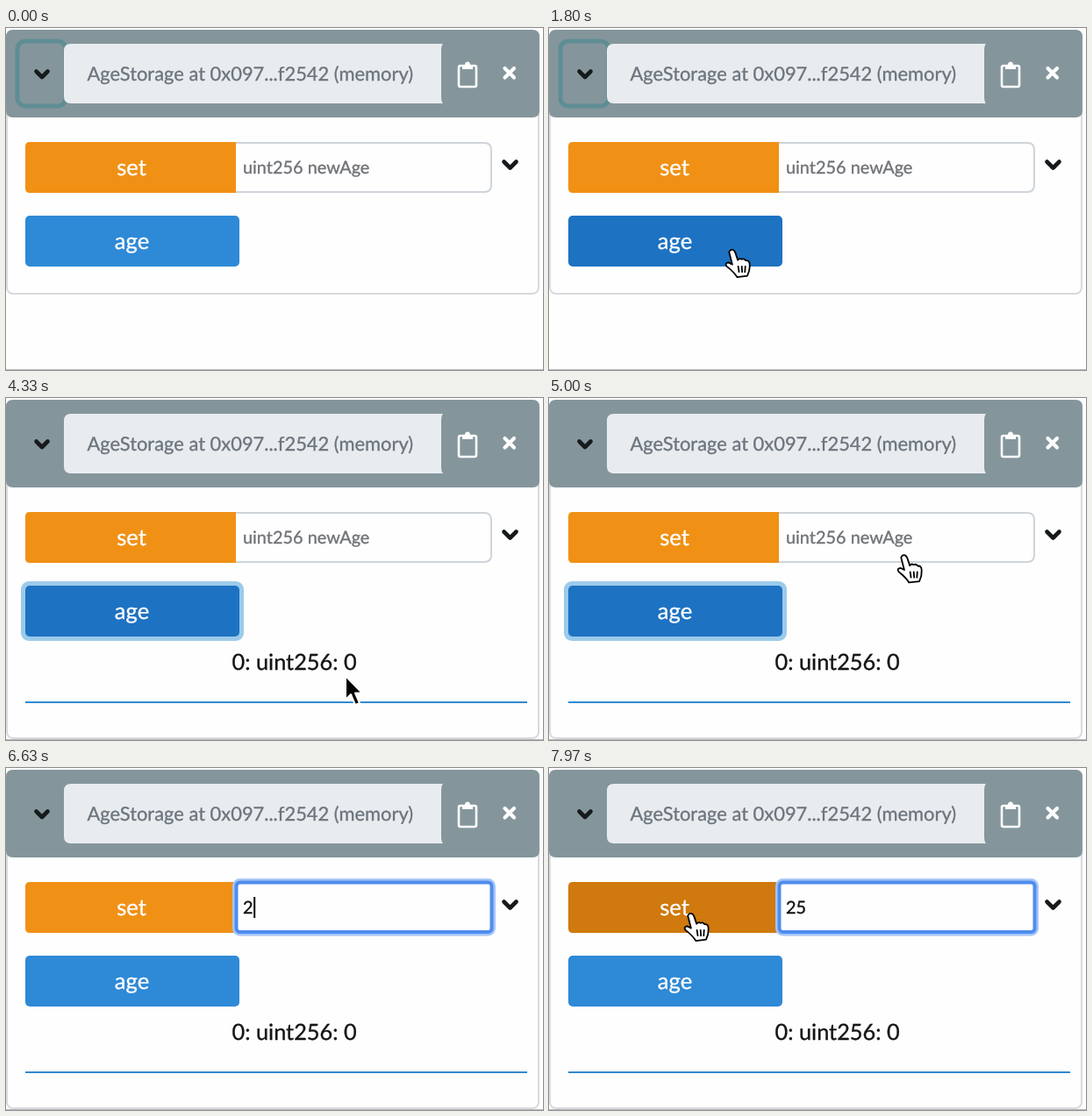
These frames come from a looping animation (612 px wide and 390 px high, 8 s). An HTML page:

```html
<!DOCTYPE html>
<html lang="en">
<head>
<meta charset="utf-8">
<title>Contract panel</title>
<style>
  html, body { margin: 0; width: 100%; height: 100%; overflow: hidden; background: #fefefe; }
  svg { display: block; width: 612px; height: 390px; }
  text {
    font-family: Lato, sans-serif; font-size: 25.3px; white-space: pre;
    text-rendering: geometricPrecision;
    color: #151515; fill: currentColor; stroke: currentColor; stroke-width: 0.35px;
  }
  .label { color: #fefefe; text-anchor: middle; font-size: 25.6px; }
  .address { color: #6c757d; font-size: 21.9px; }
  #field { font-size: 19.9px; }
  .icon { fill: none; stroke: #161a1c; stroke-width: 4.6; stroke-linecap: round; stroke-linejoin: round; }
  .white { stroke: #fefefe; }
  .pointer { fill: #fff; stroke: #000; stroke-width: 2; stroke-linejoin: round; stroke-linecap: round; }
</style>
</head>
<body>
<svg viewBox="0 0 612 390">
  <rect width="612" height="390" fill="#fefefe"/>
  <path d="M0 389.5H612" stroke="#b8b8bc"/>
  <rect id="card" x="1" y="60" width="606" height="243" rx="7" fill="#fefefe" stroke="#d9dade" stroke-width="2"/>
  <path d="M0 102V10Q0 2 8 2H600Q608 2 608 10V94Q608 102 600 102H8Q0 102 0 94Z" fill="#84969c"/>

  <rect id="toggleRing" x="13" y="15" width="55" height="74" rx="9" fill="none" stroke="#5f8d94" stroke-width="5"/>
  <path class="icon" d="M34.500 49.500L41 56L47.500 49.500"/>
  <path d="M74 18H498Q496 20 496 26V78Q496 84 498 86H74Q66 86 66 78V26Q66 18 74 18Z" fill="#e9ecef"/>
  <text class="address" x="92.500" y="59.500">AgeStorage at 0x097...f2542 (memory)</text>
  <rect class="icon white" x="516" y="43" width="20" height="24" rx="2" style="stroke-width:2.600"/>
  <path d="M520 47V43Q520 42 521 42H523Q523 38.500 526 38.500T529 42H531Q532 42 532 43V47Z" fill="#fefefe"/>
  <path class="icon white" d="M568.500 46L579 56.500M579 46L568.500 56.500" style="stroke-width:4.200"/>

  <path d="M262 131H545Q553 131 553 139V179Q553 187 545 187H262" fill="#fefefe" stroke="#ced4da" stroke-width="2"/>
  <path id="setButton" d="M27 130H262V188H27Q22 188 22 183V135Q22 130 27 130Z"/>
  <text class="label" x="143" y="168">set</text>
  <g id="inputRing" fill="#fefefe">
    <rect x="261.500" y="129.500" width="293" height="58.500" rx="5" stroke="#a6c6f7" stroke-width="7"/>
    <rect x="262.500" y="130.500" width="291" height="56.500" rx="4" stroke="#4f8cee" stroke-width="4"/>
  </g>
  <text id="field" x="270" y="166"></text>
  <rect id="caret" y="147" width="2" height="24" fill="#000"/>
  <path class="icon" d="M567.500 152.500L574.500 159.500L581.500 152.500"/>

  <rect id="ageRing" x="17" y="209" width="254" height="68" rx="9" fill="#9ccbea"/>
  <rect id="ageButton" x="22" y="214" width="244" height="58" rx="5"/>
  <text class="label" x="143.500" y="251.500">age</text>

  <g id="result">
    <text x="257.500" y="309.500">0: uint256: 0</text>
    <path d="M22 347H594" stroke="#3189d0" stroke-width="2"/>
  </g>

  <g id="cursor">
    <path id="arrow" class="pointer" style="fill:#000;stroke:#fff" d="M0 0V27L6 21L11 33L16 31L11 19.500H19Z"/>
    <g id="hand" class="pointer" transform="translate(-1 0) scale(.9)">
      <path d="M-3 3Q-2 -1 2 0Q4 1 5 4L8 13Q10 10 13 12Q16 10.500 18 13.500Q23 13 23 19Q23.500 26 20 33L7 34.500Q3 28 -6 21Q-9 17 -4 16L1 18.500Z"/>
      <path d="M8.500 21L9.500 28M13 21L13.500 28M17.500 21L17 28"/>
    </g>
  </g>
</svg>
<script>
const LOOP = 8000;
const el = id => document.getElementById(id);
const show = (id, on) => { el(id).style.display = on ? "" : "none"; };
const ease = p => p * p * (3 - 2 * p);
const ramp = (t, from, to) => Math.min(1, Math.max(0, (t - from) / (to - from)));
const mix = (a, b, p) => `rgb(${a.map((v, i) => Math.round(v + (b[i] - v) * p))})`;

const BLUE = [46, 137, 214], BLUE_HOVER = [29, 114, 194];
const ORANGE = [240, 145, 22], ORANGE_HOVER = [207, 121, 14];

// time, x, y of the pointer tip
const PATH = [
  [0, 612, 404], [400, 588, 350], [850, 520, 272], [1250, 350, 262], [1650, 214, 253],
  [1800, 209, 253], [2200, 235, 246], [3130, 235, 246], [3370, 334, 274],
  [3620, 422, 206], [3900, 400, 350], [4120, 330, 330], [4330, 387, 317],
  [4560, 440, 324], [4820, 428, 235], [5050, 402, 172], [5300, 395, 175],
  [6950, 395, 175], [7270, 390, 204], [7550, 260, 200], [7820, 162, 166], [8000, 162, 166]
];
const TYPED = [[6470, "2"], [6800, "25"]];
const CARET_ON = [[5450, 6050], [6470, 7470]];

function pointerAt(t) {
  const i = Math.max(1, PATH.findIndex(k => k[0] > t));
  const [t0, x0, y0] = PATH[i - 1], [t1, x1, y1] = PATH[i];
  const p = ease(ramp(t, t0, t1));
  return [x0 + (x1 - x0) * p, y0 + (y1 - y0) * p];
}

function draw(t) {
  const clicked = t >= 2000, opened = t >= 2270;

  show("toggleRing", !clicked);
  el("card").setAttribute("height", opened ? 328 : 243);
  show("result", opened);

  const blur = ramp(t, 5450, 5900);
  el("ageButton").setAttribute("fill", mix(BLUE, BLUE_HOVER, ramp(t, 1560, 1760) * (1 - blur)));
  el("ageRing").setAttribute("opacity", ramp(t, 2000, 2200) * (1 - blur));
  el("setButton").setAttribute("fill", mix(ORANGE, ORANGE_HOVER, ramp(t, 7680, 7880)));

  el("inputRing").setAttribute("opacity", ramp(t, 5430, 5500));
  const typed = TYPED.reduce((text, [at, value]) => t >= at ? value : text, "");
  el("field").textContent = typed || "uint256 newAge";
  el("field").style.color = typed ? "#111" : "#6f7276";
  el("caret").setAttribute("x", 270 + typed.length * 11.6 + (typed ? 0.6 : 0));
  show("caret", CARET_ON.some(([a, b]) => t >= a && t < b));

  const [x, y] = pointerAt(t);
  const inside = (l, top, r, b) => x > l && x < r && y > top && y < b;
  const hand = inside(22, 214, 266, 272) || inside(22, 130, 553, 188);
  show("cursor", t < 6470 || t >= 6950);
  show("hand", hand);
  show("arrow", !hand);
  el("cursor").setAttribute("transform", `translate(${x.toFixed(1)} ${y.toFixed(1)})`);
}

const start = performance.now();
function tick() {
  draw((performance.now() - start) % LOOP);
  requestAnimationFrame(tick);
}
tick();
</script>
</body>
</html>
```
